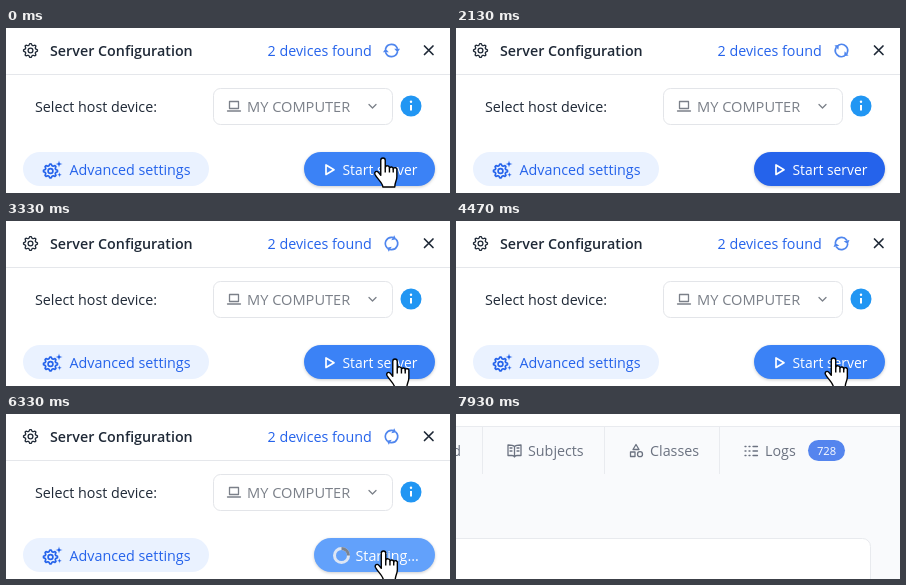
These frames come from a looping animation (444 px wide and 165 px high, 8000 ms). An HTML page:

```html
<!DOCTYPE html>
<html lang="en">
<head>
<meta charset="utf-8">
<title>Server configuration</title>
<style>
  html, body { margin: 0; width: 100%; height: 100%; overflow: hidden; background: #fefefe; }
  svg { display: block; width: 444px; height: 165px; font: 14.3px "Open Sans", "Noto Sans", sans-serif; }
  .line { fill: none; stroke: currentColor; stroke-width: 1.3; stroke-linecap: round; stroke-linejoin: round; }
  .bold { stroke-width: 1.7; }
  text { fill: currentColor; }
  #button { filter: drop-shadow(0 1.5px 1.5px rgb(0 0 0 / .2)); }
</style>
</head>
<body>
<svg viewBox="0 0 444 165">
  <defs>
    <g id="half">
      <path class="line bold" d="M-5.9-1.8A6.2 6.2 0 0 1 5.7-2.4"/>
      <path d="M2.7-1.8H8.5L6 2Z" fill="currentColor"/>
    </g>
  </defs>

  <g id="page">
    <rect width="444" height="165" fill="#f9fafc"/>
    <rect width="444" height="12" fill="#fff"/>
    <path d="M0 12.5H444M26.5 13V60M148.5 13V60M263.5 13V60" stroke="#e9ebef"/>
    <rect x="-20" y="124.5" width="434.5" height="80" rx="8" fill="#fff" stroke="#e8eaee"/>
    <g color="#6b7280">
      <text x="5" y="42" text-anchor="end">d</text>
      <text x="72" y="42">Subjects</text>
      <text x="194" y="42">Classes</text>
      <text x="309" y="42">Logs</text>
      <path class="line" d="M58.5 32.5Q57 31 52 31V41.5H56Q58 41.5 58.5 43Q59 41.5 61 41.5H65V31Q60 31 58.5 32.5V42.5M54 34H56M54 37H56M61 34H63M61 37H63"/>
      <path class="line" d="M180 30.5L183 35.5H177ZM174.5 38H179V42.5H174.5Z"/>
      <circle class="line" cx="184" cy="40.2" r="2.5"/>
      <path class="line" d="M289 32.5H290M289 37H290M289 41.5H290M293 32.5H294M293 37H294M293 41.5H294M297 32.5H301.5M297 37H301.5M297 41.5H301.5"/>
    </g>
    <rect x="352" y="26" width="37" height="21" rx="10.5" fill="#5585ee"/>
    <text x="370.5" y="41" font-size="11.2" text-anchor="middle" color="#fff">728</text>
  </g>

  <g id="dialog">
    <rect width="444" height="165" fill="#fff"/>
    <path d="M0 46.5H444" stroke="#e5e7eb"/>
    <g color="#1f2937">
      <path class="line gear" transform="translate(24.5 22.5)"/>
      <circle class="line" cx="24.5" cy="22.5" r="2.4"/>
      <text x="44" y="28" font-weight="600">Server Configuration</text>
      <text x="29" y="84">Select host device:</text>
      <path class="line bold" d="M418.5 18L427 26.5M427 18L418.5 26.5"/>
    </g>
    <g color="#2563eb">
      <text x="261.5" y="28">2 devices found</text>
      <g id="sync" color="#4f86ee"><use href="#half"/><use href="#half" transform="rotate(180)"/></g>
    </g>

    <rect x="207.5" y="60.5" width="179" height="36" rx="7" fill="#fff" stroke="#e3e5e9"/>
    <g color="#7b8089">
      <text x="241" y="84" font-size="14.6">MY COMPUTER</text>
      <path class="line" d="M223.5 73.5H232.5V80.5H223.5ZM221.5 83H234.5"/>
      <path class="line" d="M363 76.5L366.5 80L370 76.5"/>
    </g>
    <circle cx="405" cy="78" r="10.5" fill="#2196f3"/>
    <path d="M405 77V82.5" stroke="#fff" stroke-width="2"/>
    <circle cx="405" cy="73.8" r="1.2" fill="#fff"/>

    <rect x="17" y="124" width="186" height="34" rx="17" fill="#eaf2ff"/>
    <g color="#2563eb">
      <path class="line bold gear" transform="translate(44.5 143)"/>
      <circle class="line bold" cx="44.5" cy="143" r="2.4"/>
      <path d="M53 132.5L54 135L56.5 136L54 137L53 139.5L52 137L49.5 136L52 135ZM53.5 144L54.2 146L56 146.7L54.2 147.4L53.5 149.4L52.8 147.4L51 146.7L52.8 146Z" fill="currentColor" stroke="#eaf2ff" stroke-width=".4"/>
      <text x="63.5" y="147">Advanced settings</text>
    </g>

    <rect id="button" y="124" height="34" rx="17"/>
    <g id="start" color="#fff">
      <path class="line bold" d="M320 137V146.5L328 141.7Z"/>
      <text x="336.5" y="147" font-size="13.9">Start server</text>
    </g>
    <g id="starting" color="#fff">
      <g id="ring" fill="none" stroke-width="3">
        <circle r="7" stroke="#dde6f4"/>
        <path d="M0-7A7 7 0 0 1 7 0" stroke="#7d838d"/>
      </g>
      <text x="349.5" y="147">Starting...</text>
    </g>
  </g>

  <g id="cursor" fill="#fff" stroke="#000" stroke-linejoin="round">
    <g id="hand" transform="scale(1.4) translate(-6.6 -.6)">
      <path d="M5 13V2.2a1.6 1.6 0 0 1 3.2 0V7.5a1.5 1.5 0 0 1 3 .4a1.4 1.4 0 0 1 2.7 .6a1.3 1.3 0 0 1 2.6 .7V14c0 3-1.5 4-1.5 7.3H6.5C6.5 18.5 2 15 .8 12.2C.2 10.5 2 9.5 3.2 10.7Z"/>
      <path d="M8.2 7.5V11M11.2 8V11M13.9 8.5V11" fill="none"/>
    </g>
    <path id="arrow" d="M0 0V22L5 17.5L8.5 25L12 23.5L8.7 16H15.5Z"/>
  </g>
</svg>
<script>
const $ = id => document.getElementById(id);
const LOOP = 8000, STEP = 1000 / 15;
const clamp = v => Math.min(1, Math.max(0, v));
const ramp = (t, from, to) => clamp((t - from) / (to - from));
const smooth = p => p * p * (3 - 2 * p);
const mix = (a, b, p) => a + (b - a) * p;

// Eight-toothed outline
const gear = Array.from({ length: 32 }, (_, i) => {
  const r = i % 4 < 2 ? 7 : 5.4, a = (i - .5) * Math.PI / 16;
  return (r * Math.cos(a)).toFixed(2) + ' ' + (r * Math.sin(a)).toFixed(2);
});
document.querySelectorAll('.gear').forEach(el => el.setAttribute('d', 'M' + gear.join('L') + 'Z'));

// Pointer stops: time, x, y
const stops = [
  [0, 377, 130], [130, 377, 130], [650, 279, 170], [2250, 279, 170],
  [2950, 389, 138], [3600, 389, 138], [4250, 377.5, 137],
  [6400, 377.5, 137], [6850, 318, 170], [LOOP, 318, 170]
];

function pointer(t) {
  const i = stops.findIndex(s => s[0] > t);
  const a = stops[i - 1], b = stops[i], p = smooth(ramp(t, a[0], b[0]));
  return [mix(a[1], b[1], p), mix(a[2], b[2], p)];
}

const show = (id, on) => $(id).setAttribute('visibility', on ? 'visible' : 'hidden');
const place = (id, x, y, turn = 0) => $(id).setAttribute('transform', `translate(${x} ${y}) rotate(${turn})`);

function draw(t) {
  const spin = t * .36 % 360, busy = t >= 5660;
  const hover = 1 - ramp(t, 450, 700) + ramp(t, 2500, 2800);
  const [x, y] = pointer(t);
  const dark = [37, 99, 235], light = [59, 130, 246];

  $('dialog').setAttribute('opacity', 1 - ramp(t, 6935, 7330));
  $('page').setAttribute('opacity', smooth(ramp(t, 7400, 7930)));

  const left = busy ? 308 : 298, button = $('button');
  button.setAttribute('x', left);
  button.setAttribute('width', 429 - left);
  button.setAttribute('fill', busy ? '#62a1fb' : `rgb(${dark.map((c, i) => Math.round(mix(c, light[i], hover)))})`);
  show('start', !busy);
  show('starting', busy);

  place('sync', 385.5, 22.5, spin);
  place('ring', 335.5, 141.5, spin - 120);
  place('cursor', x, y);
  const over = busy || x > 300 && y < 158;
  show('hand', over);
  show('arrow', !over);
}

function tick() {
  const t = performance.now() % LOOP;
  draw(Math.floor((t + 4) / STEP) * STEP % LOOP);
  requestAnimationFrame(tick);
}
tick();
</script>
</body>
</html>
```
